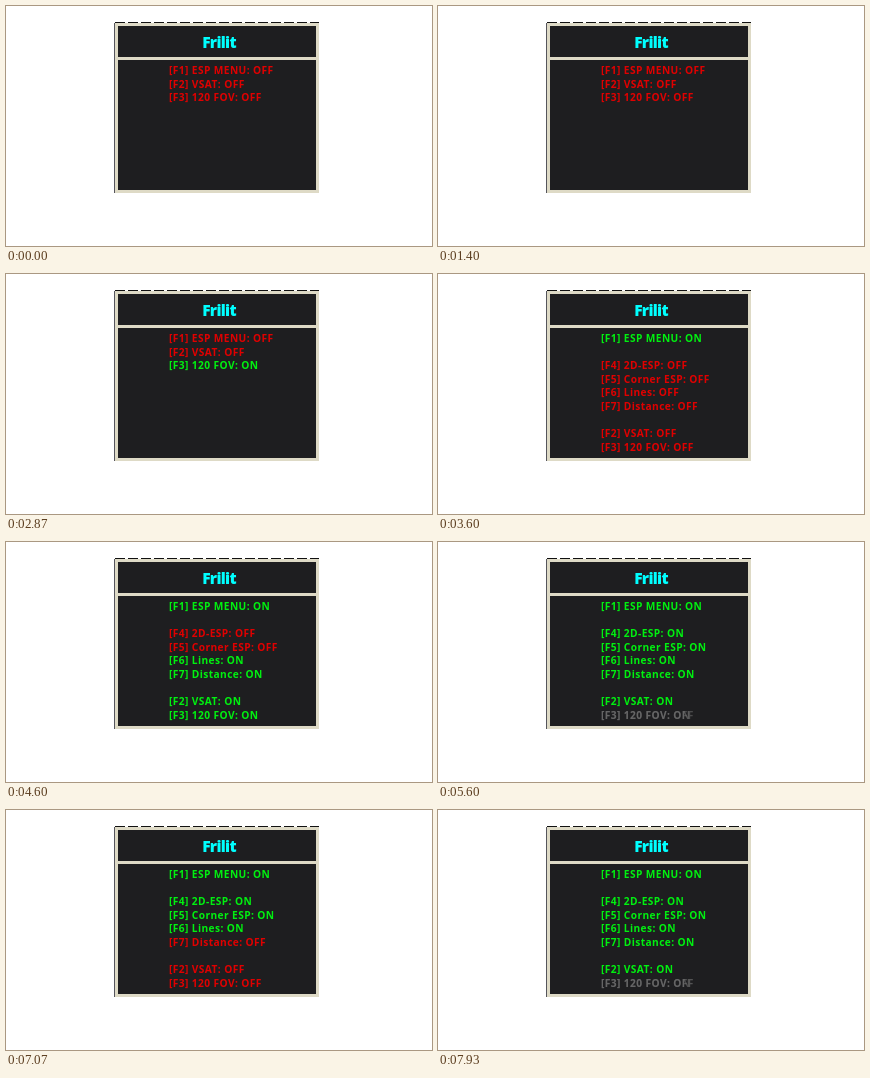
An HTML page that plays this animation: 426 by 240 pixels, repeating every 8000 ms.

```html
<!DOCTYPE html>
<html lang="en">
<head>
<meta charset="utf-8">
<title>Menu</title>
<style>
html, body { margin: 0; width: 100%; height: 100%; overflow: hidden; background: #fff; }
svg { display: block; width: 100vw; height: 100vh; }
text { white-space: pre; }
#title { font: 800 15.5px "Open Sans", sans-serif; letter-spacing: -.7px; text-anchor: middle; fill: #0ff; }
#rows { font: bold 10.2px "Noto Sans", "Open Sans", sans-serif; letter-spacing: .4px; }
</style>
</head>
<body>
<svg viewBox="0 0 426 240">
  <rect x="108" y="17" width="205" height="170" fill="#dedac6"/>
  <path d="M108.5 17V187" stroke="#55555c"/>
  <path d="M109 16.5H313" stroke="#111" stroke-dasharray="10 3"/>
  <rect x="112" y="20" width="198" height="31" fill="#1e1e20"/>
  <rect x="112" y="54" width="198" height="130" fill="#1e1e20"/>
  <text id="title" x="213" y="41.5">Frilit</text>
  <g id="rows"></g>
</svg>
<script>
const LOOP = 8000, TOP = 68, PITCH = 13.6, FADE = 70;
const labels = {
  F1: 'ESP MENU', F4: '2D-ESP', F5: 'Corner ESP', F6: 'Lines',
  F7: 'Distance', F2: 'VSAT', F3: '120 FOV'
};
const openLines = { F1: 0, F4: 2, F5: 3, F6: 4, F7: 5, F2: 7, F3: 8 };
const closedLines = { F1: 0, F2: 1, F3: 2 };

// Times at which each switch flips, starting from OFF.
const flips = {
  F1: [3000],
  F2: [2400, 2800, 3930, 5740, 7530],
  F3: [2000, 2930, 3670, 5600, 7930],
  F4: [5000],
  F5: [4730, 6160, 6530],
  F6: [4470, 6020, 6870],
  F7: [4200, 5880, 7200]
};

const rows = document.getElementById('rows');
const texts = {};
for (const key in labels) {
  texts[key] = [0, 1].map(() => {
    const el = document.createElementNS('http://www.w3.org/2000/svg', 'text');
    el.setAttribute('x', 163);
    return rows.appendChild(el);
  });
}

function put(el, key, on, line, color, opacity) {
  el.textContent = `[${key}] ${labels[key]}: ${on ? 'ON' : 'OFF'}`;
  el.setAttribute('y', TOP + line * PITCH);
  el.setAttribute('fill', color);
  el.setAttribute('opacity', opacity);
}

function draw(now) {
  const t = now % LOOP;
  const lines = t >= flips.F1[0] ? openLines : closedLines;
  for (const key in labels) {
    const past = flips[key].filter(f => f <= t);
    const on = past.length % 2 === 1;
    const line = lines[key];
    const shown = line !== undefined;
    const fading = shown && past.length > 0 && t - past[past.length - 1] < FADE;
    const [main, ghost] = texts[key];
    const color = fading ? '#777' : on ? '#00f010' : '#e00000';
    put(main, key, on, line || 0, color, shown ? (fading ? .5 : 1) : 0);
    put(ghost, key, !on, line || 0, '#777', fading ? .6 : 0);
  }
  requestAnimationFrame(draw);
}
requestAnimationFrame(draw);
</script>
</body>
</html>
```
